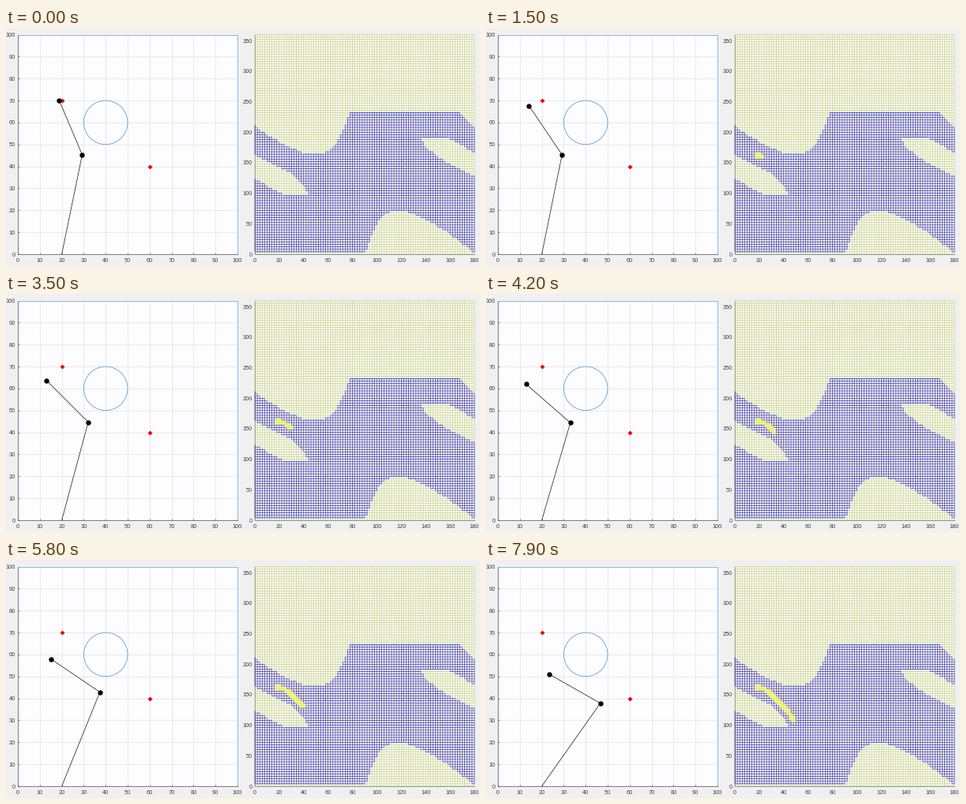
A matplotlib script that plays this animation: 600 by 302 pixels, repeating every 8000 ms.

```python
import numpy as np
import matplotlib.pyplot as plt
from matplotlib.animation import FuncAnimation
from matplotlib.collections import LineCollection

W, H, DPI = 600, 302, 100
PX = 72 / DPI
FRAMES, STEP = 80, 100
INK = "#404040"

# Arm: link lengths, key times and joint angles in degrees
BASE, LINK1, LINK2 = (20, 0), 46.25, 26.85
KEYS = [0, 1.5, 4.9, 6.6, 7.9]
SHOULDER = [78.4, 78.5, 72.4, 64.0, 54.8]
ELBOW = [34.5, 45.5, 70.3, 84.8, 95.6]

# Mesh classes with their colours, line widths and stacking
FREE, RIM, BLOCKED, TRAIL = range(4)
COLORS = np.array([(52, 46, 150), (62, 88, 210), (195, 204, 130), (228, 236, 60)]) / 255
WIDTHS = np.array([0.65, 1.0, 0.65, 1.3]) * PX
STACK = [0, 2, 1, 3]

plt.rcParams.update({"font.family": "Liberation Sans", "font.size": 7.4 * PX})
fig = plt.figure(figsize=(W / DPI, H / DPI), dpi=DPI, facecolor="#f0f0f0")


def panel(x0, x1, xmax, ymax, xticks, yticks, face):
    top, bottom = 8.5, 287
    ax = fig.add_axes([x0 / W, 1 - bottom / H, (x1 - x0) / W, (bottom - top) / H],
                      facecolor=face)
    ax.set(xlim=(0, xmax), ylim=(0, ymax), xticks=xticks, yticks=yticks)
    ax.tick_params(length=0, labelcolor=INK)
    ax.tick_params(axis="x", pad=5 * PX)
    ax.tick_params(axis="y", pad=3 * PX)
    ax.set_axisbelow(True)
    for side in ax.spines.values():
        side.set(linewidth=0.7 * PX, color="#505050")
    return ax


tens = range(0, 101, 10)
arm_ax = panel(15, 293, 100, 100, tens, tens, "#fdfcff")
arm_ax.tick_params(direction="in", length=2.5 * PX, width=0.6 * PX, color=INK)
arm_ax.grid(color="#e4e4e6", linewidth=0.8 * PX)
for side in ("top", "right"):
    arm_ax.spines[side].set(color="#6aabdc")
arm_ax.add_patch(plt.Circle((40, 60), 10, fill=False, ec="#4593cd", lw=0.7 * PX))
arm_ax.plot([20, 60], [70, 40], "D", color="#f00000", ms=4.2 * PX, mew=0)
arm, = arm_ax.plot([], [], "k-o", lw=0.65 * PX, ms=6.4 * PX, mew=0, markevery=[1, 2], zorder=5)

map_ax = panel(315, 593, 180, 360, range(0, 181, 20), range(0, 351, 50), "white")
for side in ("top", "right"):
    map_ax.spines[side].set_visible(False)
mesh = LineCollection([], snap=False, capstyle="butt", zorder=3, clip_on=False)
map_ax.add_collection(mesh, autolim=False)

xs, ys = np.arange(0, 181, 2), np.arange(0, 361, 4)
gx, gy = np.meshgrid(xs, ys)
SCALE = 278 / 180, 278.5 / 360


def curve(x, start, end, power):
    """Power ease from 0 at start to 1 at end, flat before start."""
    return np.clip((x - start) / (end - start), 0, None) ** power


def blocked_area(x, y):
    dip = 164 + 48 * curve(x, 48, 0, 1.45) + 69 * curve(x, 48, 77, 2.6)
    ceiling = y > np.minimum(dip, 233 - 22 * curve(x, 168, 180, 1))
    wedge = ((y < 192 - 27 * curve(x, 156, 180, 1))
             & (y > 192 - 64 * curve(x, 137, 181, 0.62)))
    hill = y < 71 * (1 - curve(x, 118, 91, 2.6) - curve(x, 118, 180, 1.45))
    lobe = ((y < 162 - x - 21 * curve(x, 0, 43, 6))
            & (y > np.maximum(97, 126 - 1.17 * x)))
    return ceiling | wedge | hill | lobe | (y == 0)


walls = blocked_area(gx, gy)


def trail(t):
    x = 17 + 3.3 * t + 0.09 * t ** 2
    return x, 162 - 0.355 * np.maximum(x - 20, 0) ** 1.5


def classify(t):
    tx, ty = trail(np.linspace(0, t, 60))
    gap = np.hypot((gx[..., None] - tx) * SCALE[0], (gy[..., None] - ty) * SCALE[1])
    seen = gap.min(axis=-1) < 2
    solid = np.pad(walls | seen, 1, mode="edge")
    near = solid[2:, 1:-1] | solid[:-2, 1:-1] | solid[1:-1, 2:] | solid[1:-1, :-2]
    return np.select([seen, walls, near], [TRAIL, BLOCKED, RIM], FREE)


def runs(levels, along, across):
    """Merge equal neighbouring edges of each grid line into one segment."""
    for row, pos in zip(levels, across):
        a, b = row[:-1], row[1:]
        kind = np.maximum(a, b)
        kind[(a != b) & (kind == RIM)] = FREE
        cuts = np.r_[0, np.flatnonzero(np.diff(kind)) + 1, len(kind)]
        for i, j in zip(cuts[:-1], cuts[1:]):
            yield kind[i], (along[i], pos), (along[j], pos)


def draw(i):
    t = i * STEP / 1000
    a = np.radians(np.interp(t, KEYS, SHOULDER))
    b = a + np.radians(np.interp(t, KEYS, ELBOW))
    ex, ey = BASE[0] + LINK1 * np.cos(a), BASE[1] + LINK1 * np.sin(a)
    arm.set_data([BASE[0], ex, ex + LINK2 * np.cos(b)],
                 [BASE[1], ey, ey + LINK2 * np.sin(b)])

    levels = classify(t)
    lines = list(runs(levels, xs, ys))
    lines += [(k, p[::-1], q[::-1]) for k, p, q in runs(levels.T, ys, xs)]
    lines.sort(key=lambda line: STACK[line[0]])
    kinds = [line[0] for line in lines]
    mesh.set_segments([line[1:] for line in lines])
    mesh.set(color=COLORS[kinds], linewidth=WIDTHS[kinds])
    return arm, mesh


anim = FuncAnimation(fig, draw, frames=FRAMES, interval=STEP, repeat=True, repeat_delay=0)
plt.show()
```
